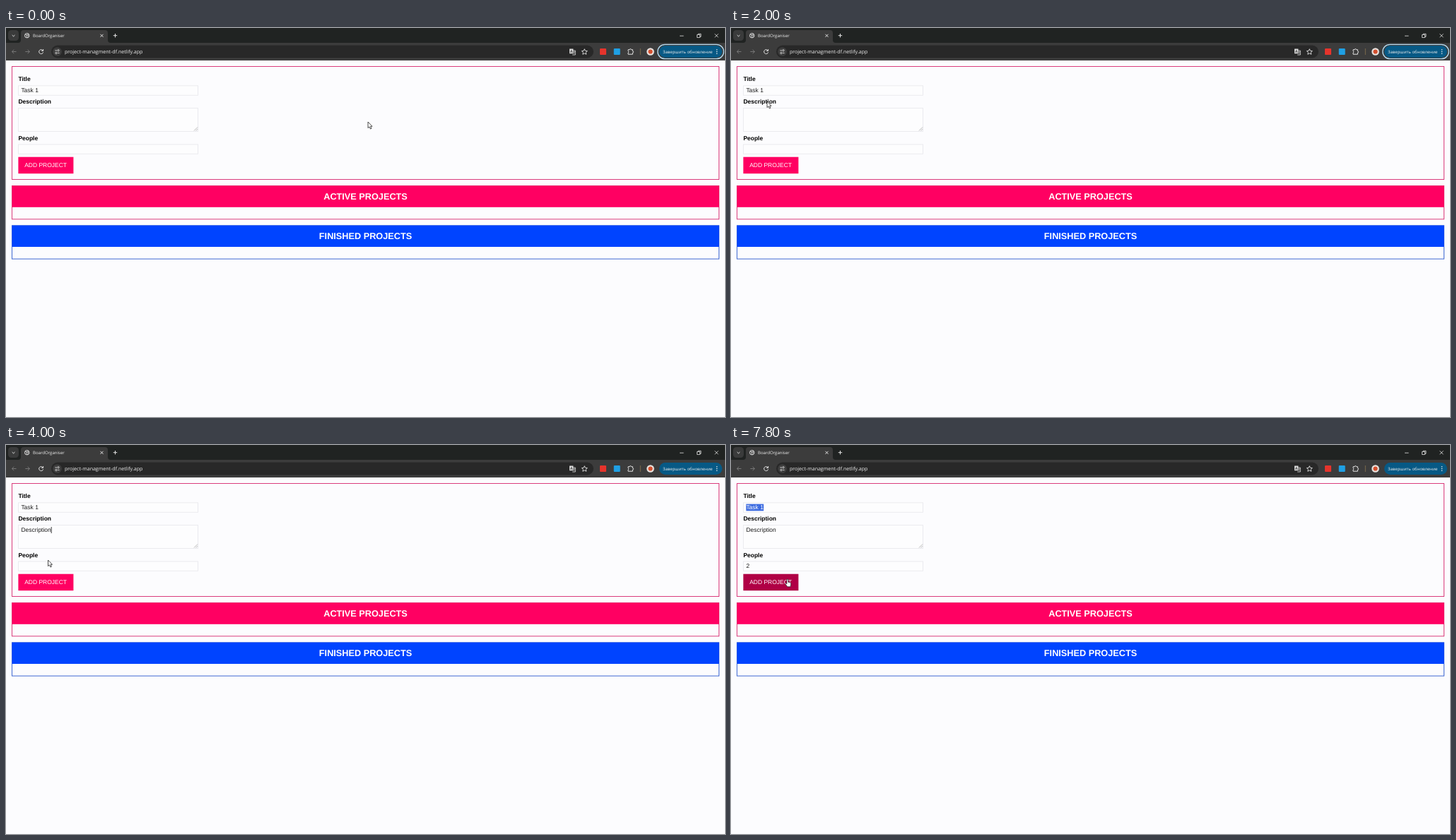
Animation, 1017 px wide and 551 px high, one loop 8000 ms. Source, as an HTML page:

```html
<!DOCTYPE html>
<html lang="en">
<head>
<meta charset="utf-8">
<title>BoardOrganiser</title>
<style>
html, body { margin: 0; width: 100%; height: 100%; overflow: hidden; background: #fcfcfe; }
svg { display: block; text-rendering: geometricPrecision; }
.page { font: 8.475px "Liberation Sans", Arial, sans-serif; fill: #1c1c1c; }
.label { font-weight: bold; fill: #000; }
.head { font-size: 12.71px; font-weight: bold; fill: #fff; text-anchor: middle; }
.ui { font: 7.06px "Open Sans", "Noto Sans", sans-serif; fill: #eee; }
.line { fill: none; stroke: #e4e4e4; }
.white { fill: #fff; }
.box { fill: #fdfdfe; stroke: #ebebef; }
</style>
</head>
<body>
<svg width="1017" height="551" viewBox="0 0 1017 551">
  <defs>
    <clipPath id="titleClip"><rect id="titleCut" y="83" height="11"/></clipPath>
  </defs>
  <rect width="1017" height="551" fill="#fcfcfe"/>

  <!-- browser frame -->
  <g class="ui">
    <rect width="1017" height="22" fill="#202322"/>
    <rect y="21" width="1017" height="25" fill="#3c3c3c"/>
    <path d="M17 21q4 0 4-4V7q0-4 4-4H140q4 0 4 4V17q0 4 4 4z" fill="#3c3c3c"/>
    <rect x="3" y="3" width="15" height="15" rx="4.5" fill="#3a3b3b"/>
    <rect x="64" y="24.5" width="767" height="18" rx="9" fill="#282828"/>
    <circle cx="72.5" cy="33.5" r="6.3" fill="#3e3e3e"/>
    <text x="38" y="13.2" font-size="6.05">BoardOrganiser</text>
    <text x="83" y="36.1">project-managment-df.netlify.app</text>
    <g class="line" stroke-width="1">
      <path d="M8.7 10l1.9 1.9 1.9-1.9M133.5 8.8l4 4m0-4l-4 4M151.8 10.7h5.4m-2.7-2.7v5.4"/>
      <path d="M953 11.2h5.5M977.5 9.5h4v4h-4zM979 9.3V8.3h4v4h-1.3M1002.5 8.3l5 5m0-5l-5 5" stroke-width=".8"/>
      <path d="M14.5 33.5h-6m2.7-2.8l-2.8 2.8 2.8 2.8M27.3 33.5h6m-2.7-2.8l2.8 2.8-2.8 2.8" stroke="#777"/>
      <path d="M52.2 32a3 3 0 1 0 .4 2.3M52.6 30v2.4h-2.4"/>
      <path d="M69.5 31.8h2.4M73.2 35.4h2.4" stroke-width=".9"/>
      <circle cx="74" cy="31.8" r="1.2" stroke-width=".8"/>
      <circle cx="71" cy="35.4" r="1.2" stroke-width=".8"/>
      <circle cx="29.7" cy="10.7" r="3.2"/>
      <path d="M27.3 9l2.5 1.1-1 1.7M31.5 8.2l-1 1.8 2 1.5M29 13.3l1.5-1.5"/>
      <path d="M818.3 29.7l1.2 2.6 2.8.3-2.1 1.9.6 2.8-2.5-1.4-2.5 1.4.6-2.8-2.1-1.9 2.8-.3z" stroke-width=".9"/>
      <path d="M880 30.7h2.2a1.1 1.1 0 0 1 2.2 0h2v2.1a1.1 1.1 0 0 1 0 2.2v2.2H880v-2.3a1.1 1.1 0 0 0 0-2.1z"/>
      <path d="M801.5 32h3.8v6h-4.2" stroke-width=".8"/>
    </g>
    <rect x="797" y="29.5" width="5.4" height="6.7" fill="#ddd"/>
    <path d="M798.2 35l1.5-3.8 1.5 3.8m-2.5-1.2h2" fill="none" stroke="#333" stroke-width=".7"/>
    <path d="M802.5 33.6h2.3m-.4 0q-.3 1.7-1.8 2.8m.2-1.8l1.7 2" fill="none" stroke="#ddd" stroke-width=".6"/>
    <rect x="840" y="29" width="9" height="9" rx="1" fill="#e6342c"/>
    <rect x="859.7" y="29" width="9" height="9" rx="1" fill="#1fa0e4"/>
    <path d="M897.3 29v9" stroke="#7a6a4a"/>
    <circle cx="911.5" cy="33.5" r="5.3" fill="#e9e3df"/>
    <circle cx="911.5" cy="33.5" r="3.1" fill="#d4502f"/>
    <rect x="924" y="25" width="89" height="17" rx="8.5" fill="#075985"/>
    <rect id="ring" x="921.8" y="23.3" width="93.4" height="20.4" rx="10.2" fill="none" stroke="#b5dcf2" stroke-width="1.3"/>
    <text x="929" y="35.6" font-size="6.03">Завершить обновление</text>
    <circle cx="1005.5" cy="30.8" r=".8"/><circle cx="1005.5" cy="33.5" r=".8"/><circle cx="1005.5" cy="36.2" r=".8"/>
  </g>

  <!-- page -->
  <g class="page">
    <g fill="none" stroke="#da3c7c">
      <rect x="8.5" y="54.5" width="1000" height="160"/>
      <rect x="8.5" y="223.5" width="1000" height="47.3"/>
      <rect x="8.5" y="279.8" width="1000" height="47.3" stroke="#3f68d2"/>
    </g>
    <rect x="8.5" y="223.5" width="1000" height="30.3" fill="#ff0062"/>
    <rect x="8.5" y="279.7" width="1000" height="30.3" fill="#0044ff"/>
    <text class="head" x="508.5" y="243.2">ACTIVE PROJECTS</text>
    <text class="head" x="508.5" y="299.4">FINISHED PROJECTS</text>

    <rect class="box" x="17.5" y="81.8" width="254" height="13.5"/>
    <rect class="box" x="17.5" y="113.5" width="254" height="33"/>
    <rect class="box" x="17.5" y="165" width="254" height="13.3"/>
    <path d="M266 145.5l5-5M268.7 145.5l2.3-2.3" stroke="#999" stroke-width=".7"/>

    <text class="label" x="17.4" y="75.2">Title</text>
    <rect id="labelMark" x="17.4" y="99.5" width="46.8" height="9.7" fill="#3a69d8"/>
    <text class="label" id="label" x="17.4" y="107">Description</text>
    <text class="label" x="17.4" y="158.5">People</text>

    <text x="21.4" y="91.2">Task 1</text>
    <g clip-path="url(#titleClip)">
      <rect x="21.4" y="83.6" width="24.8" height="9.7" fill="#3c6be0"/>
      <text class="white" x="21.4" y="91.2">Task 1</text>
    </g>
    <text id="desc" x="21.4" y="123.4">Description</text>
    <text id="people" x="21.4" y="174.4">2</text>
    <path id="caret" stroke="#111" stroke-width=".8"/>
    <path id="spinner" d="M261.7 170.4l2.3-2.7 2.3 2.7zM261.7 172.6l2.3 2.7 2.3-2.7z" fill="#555"/>

    <rect id="button" x="17.4" y="182.7" width="78" height="23.5"/>
    <text class="white" x="26.2" y="197.4">ADD PROJECT</text>
  </g>

  <!-- pointers, each with its hot spot at 0,0 -->
  <g id="pointer" stroke-linejoin="round">
    <path id="arrow" d="M0 0V8.6L2 6.9 3.4 10 4.9 9.3 3.6 6.3H6z" fill="#fff" stroke="#222" stroke-width=".8"/>
    <path id="beam" d="M-2-4H-.5L0-3.6.5-4H2M0-3.6V3.6M-2 4H-.5L0 3.6.5 4H2" fill="none" stroke="#222" stroke-width=".9"/>
    <path id="hand" d="M-1 1q0-1 1-1t1 1V4.3l3 .8q1 .3.8 1.5L4.2 10.8H-.2L-3 7q-.3-1 .6-1.2L-1 6.8z" fill="#fff" stroke="#222" stroke-width=".7"/>
  </g>
</svg>
<script>
const LOOP = 8000, STEP = 100;

// time, x, y
const path = [
  [200, 512, 133], [1300, 158, 123], [2000, 51, 104], [2900, 51, 104],
  [3200, 75, 128], [3700, 75, 130], [4000, 59.5, 163], [4400, 100, 171],
  [5100, 108, 171], [5500, 108, 171], [5800, 62, 60], [6100, 50, 88],
  [6200, 50, 88], [6500, 9, 88], [6800, 71, 134], [7100, 72, 138],
  [7500, 80, 190]
];

const el = id => document.getElementById(id);
const show = (id, on) => el(id).style.display = on ? '' : 'none';
const within = (v, a, b) => v >= a && v < b;

function pointerAt(t) {
  const i = path.findIndex(k => k[0] > t);
  if (i < 0) return path[path.length - 1].slice(1);
  if (!i) return path[0].slice(1);
  const [t0, x0, y0] = path[i - 1], [t1, x1, y1] = path[i];
  const u = (t - t0) / (t1 - t0), e = u * u * (3 - 2 * u);
  return [x0 + (x1 - x0) * e, y0 + (y1 - y0) * e];
}

const blink = (t, from, to) => within(t, from, to) && (t - from) % 1000 < 500;

function draw(t) {
  const [x, y] = pointerAt(t);
  const inColumn = within(x, 17, 272);
  const overPeople = inColumn && within(y, 165, 178.5);
  const overField = overPeople || inColumn && (within(y, 82, 95.5) || within(y, 113, 146.5));
  const overButton = within(x, 17, 95.5) && within(y, 183, 206);
  const dragging = within(t, 6200, 6600);
  const beam = overField || dragging;

  el('pointer').setAttribute('transform', `translate(${x} ${y})`);
  show('beam', beam);
  show('hand', overButton);
  show('arrow', !beam && !overButton);
  el('button').setAttribute('fill', overButton ? '#b00045' : '#ff0062');

  const marked = within(t, 2300, 3300);
  show('ring', t < 2200);
  show('labelMark', marked);
  el('label').style.fill = marked ? '#fff' : '';
  show('desc', t >= 3600);
  show('people', t >= 4900);
  show('spinner', overPeople || within(t, 4700, 6200));

  const left = t < 6200 ? 60 : t < 6500 ? Math.max(x, 20) : 20;
  el('titleCut').setAttribute('x', left);
  el('titleCut').setAttribute('width', 60 - left);

  const caret = blink(t, 3300, 3600) ? 'M21.6 116v9'
    : blink(t, 3600, 4700) ? 'M64.2 116v9'
    : blink(t, 4700, 4900) ? 'M21.6 167v9'
    : blink(t, 4900, 6200) ? 'M26.4 167v9' : '';
  el('caret').setAttribute('d', caret);
}

const start = performance.now();
function tick() {
  const t = (performance.now() - start + 1) % LOOP;
  draw(Math.floor(t / STEP) * STEP);
  requestAnimationFrame(tick);
}
tick();
</script>
</body>
</html>
```
